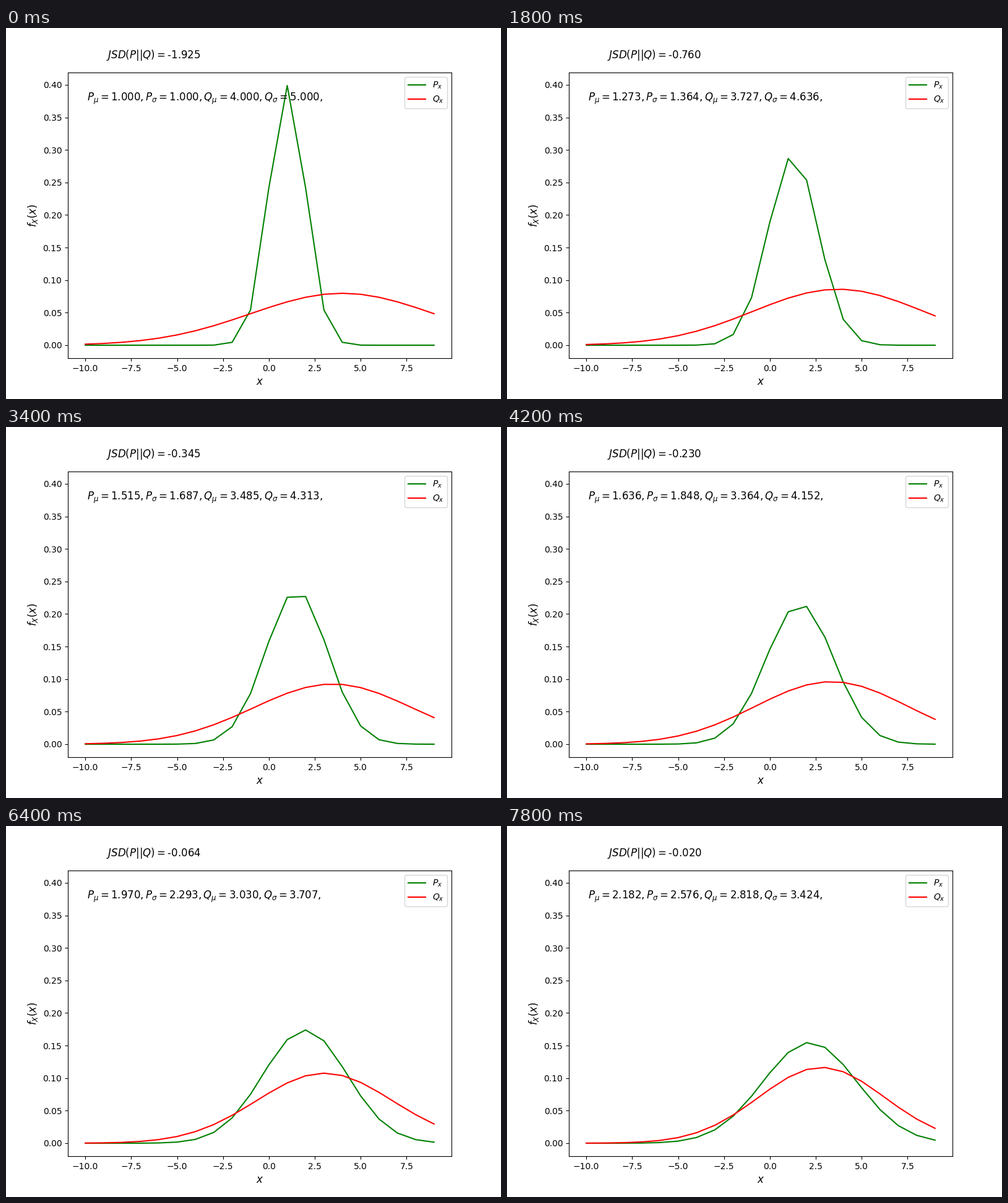
These frames come from a looping animation (800 px wide and 600 px high, 8000 ms). A matplotlib script:

```python
import numpy as np
import matplotlib.pyplot as plt
from matplotlib.animation import FuncAnimation

FRAMES = 40
STEP_MS = 200
SWEEP = 99  # steps for the two distributions to swap parameters

x = np.arange(-10, 10)


def normal(mu, sigma):
    return np.exp(-((x - mu) / sigma) ** 2 / 2) / (sigma * np.sqrt(2 * np.pi))


def divergence(p, q):
    """Mean of sum(m * log(p/m)) and sum(m * log(q/m)) on normalised weights."""
    p, q = p / p.sum(), q / q.sum()
    m = (p + q) / 2
    return 0.5 * np.sum(m * (np.log(p / m) + np.log(q / m)))


def params(i):
    t = i / SWEEP
    return 1 + 3 * t, 1 + 4 * t, 4 - 3 * t, 5 - 4 * t


fig, ax = plt.subplots(figsize=(8, 6), dpi=100)
p_mu, p_sigma, q_mu, q_sigma = params(0)
p_line, = ax.plot(x, normal(p_mu, p_sigma), color="green", label="$P_x$")
q_line, = ax.plot(x, normal(q_mu, q_sigma), color="red", label="$Q_x$")
ax.set_xlim(ax.get_xlim())
ax.set_ylim(ax.get_ylim())
ax.set_xlabel("$x$", fontsize=12)
ax.set_ylabel("$f_X(x)$", fontsize=12)
ax.legend(loc="upper right")

jsd_text = ax.text(0.1, 1.05, "", fontsize=12, transform=ax.transAxes)
param_text = ax.text(0.05, 0.9, "", fontsize=12, transform=ax.transAxes)


def update(i):
    p_mu, p_sigma, q_mu, q_sigma = params(i)
    p, q = normal(p_mu, p_sigma), normal(q_mu, q_sigma)
    p_line.set_ydata(p)
    q_line.set_ydata(q)
    jsd_text.set_text(f"$JSD(P||Q)=${divergence(p, q):.3f}")
    param_text.set_text(
        rf"$P_\mu={p_mu:.3f}, P_\sigma={p_sigma:.3f}, "
        rf"Q_\mu={q_mu:.3f}, Q_\sigma={q_sigma:.3f},$"
    )
    return p_line, q_line, jsd_text, param_text


anim = FuncAnimation(fig, update, frames=FRAMES, interval=STEP_MS,
                     repeat=True, repeat_delay=0)
plt.show()
```
